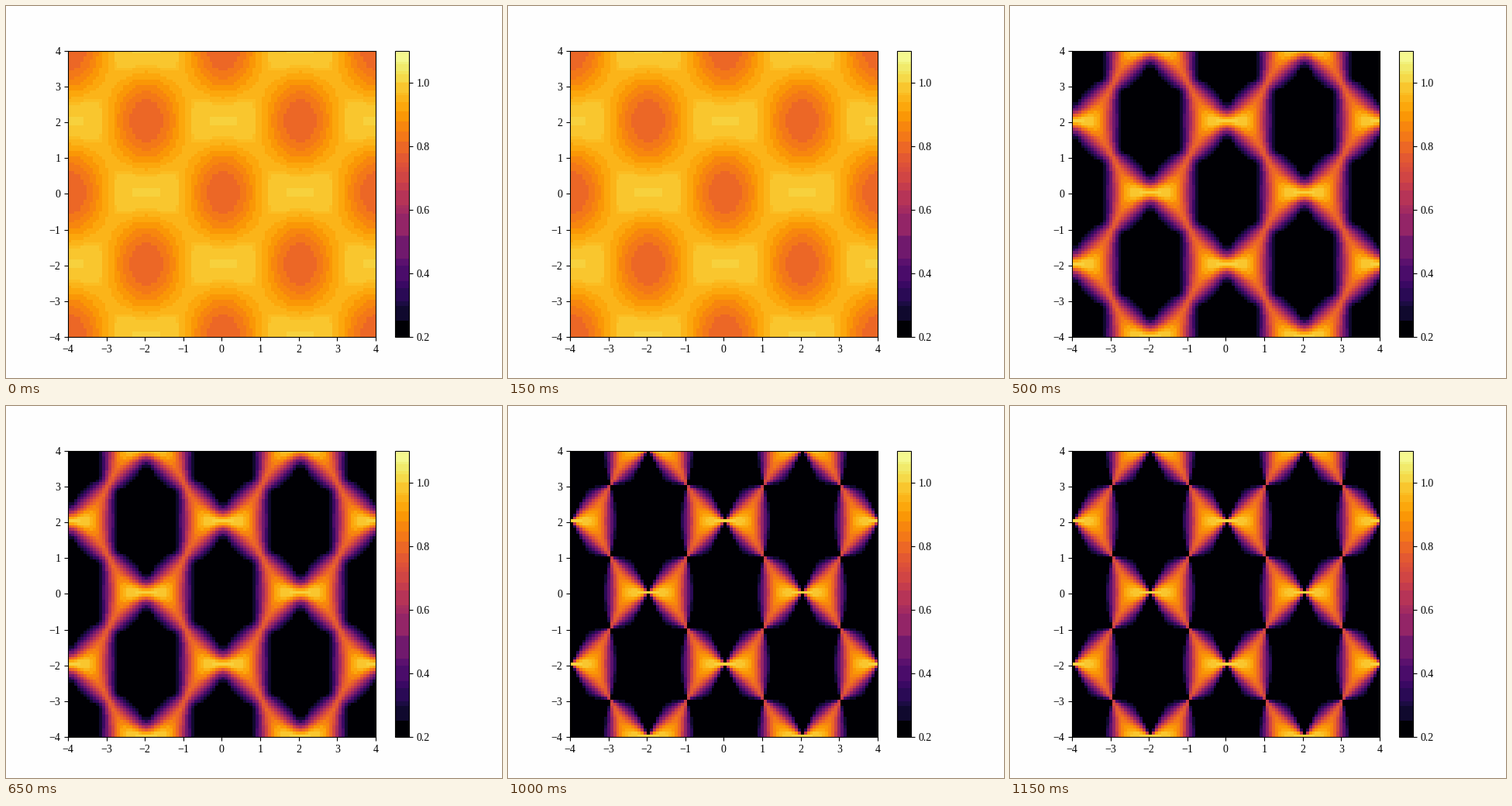
Write a matplotlib script that moves like this. It is 640 px wide and 480 px high and loops after 1250 ms.

```python
import numpy as np
import matplotlib.pyplot as plt
from matplotlib.animation import FuncAnimation
from matplotlib.colors import ListedColormap

plt.rcParams["font.family"] = "Liberation Serif"
plt.rcParams["mathtext.fontset"] = "stix"

VMIN, VMAX = 0.2, 1.1
COUPLINGS = [0.071, 0.507, 5, 50, 500]  # coupling / temperature, cooling down

axis = np.linspace(-4, 4, 101)
h, l = np.meshgrid(axis[:-1], axis[:-1])

# Phases of the four sites of a tetrahedron for the wave vector (h, h, l)
phase = np.pi / 4 * np.array([2 * h + l, -l, -l, l - 2 * h])
c, s = np.cos(phase), np.sin(phase)
c_sum, s_sum = c.sum(0), s.sum(0)
cc, ss, cs = (c * c).sum(0), (s * s).sum(0), (c * s).sum(0)


def structure_factor(eps):
    """Site-summed inverse of 1 + eps * (c c^T + s s^T), per site."""
    a, d, b = 1 + eps * cc, 1 + eps * ss, eps * cs
    quad = d * c_sum**2 + a * s_sum**2 - 2 * b * c_sum * s_sum
    return 1 - eps / 4 * quad / (a * d - b * b)


def banded_inferno(maps):
    """Inferno merged into bands of similar RGB, averaged by use."""
    rgb = np.floor(plt.get_cmap("inferno")(np.arange(256))[:, :3] * 255 + 0.5).astype(int)
    index = (np.array(maps) - VMIN) / (VMAX - VMIN) * 256
    index = np.clip(index, 0, 255).astype(int)
    weight = 130 + 15 * np.bincount(index.ravel(), minlength=256)
    key = (rgb // [32, 16, 32]) @ [256, 16, 1]
    bands = np.zeros((256, 3))
    for k in np.unique(key):
        same = key == k
        bands[same] = np.floor(np.average(rgb[same], axis=0, weights=weight[same]))
    return ListedColormap(bands / 255)


maps = [structure_factor(eps) for eps in COUPLINGS]

fig, ax = plt.subplots(figsize=(6.4, 4.8), dpi=100, facecolor="#fefefe")
mesh = ax.pcolormesh(axis, axis, maps[0], cmap=banded_inferno(maps),
                     vmin=VMIN, vmax=VMAX)
ax.set_xticks(range(-4, 5))
ax.set_yticks(range(-4, 5))
fig.colorbar(mesh, ax=ax, ticks=[0.2, 0.4, 0.6, 0.8, 1.0])


def update(i):
    mesh.set_array(maps[i])
    return [mesh]


anim = FuncAnimation(fig, update, frames=len(maps), interval=250,
                     repeat=True, repeat_delay=0)
plt.show()
```
